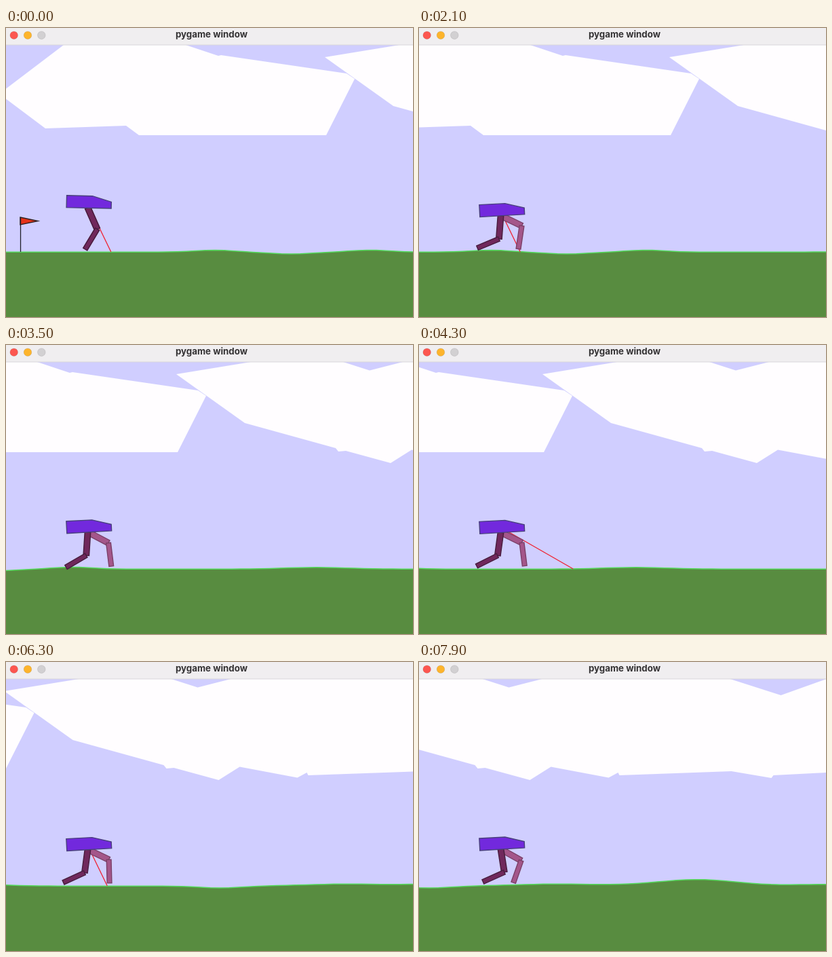
An HTML page with a canvas for the animation above (8 s loop, 600x426 px).

```html
<!DOCTYPE html>
<html lang="en">
<head>
<meta charset="utf-8">
<title>pygame window</title>
<style>
  html, body { margin: 0; width: 100%; height: 100%; overflow: hidden; }
  canvas { display: block; }
  h1 {
    position: absolute; left: 0; top: 0; width: 600px; margin: 0;
    box-sizing: border-box; padding-left: 6px;
    font: bold 13.3px/18px Inter, sans-serif; text-align: center; color: #343234;
  }
</style>
</head>
<body>
<canvas id="stage" width="600" height="426"></canvas>
<h1>pygame window</h1>
<script>
const ctx = document.getElementById('stage').getContext('2d');
const LOOP = 8000, STEP = 100, RAD = Math.PI / 180, END = 1850;

// Cloud corners; clouds scroll at half the speed of the ground.
const clouds = [
  [-10,97, 85,25, 265,25, 313,41, 317,40, 502,67, 514,75, 472,158, 196,158, 177,144, 58,148],
  [470,43, 580,25, 716,25, 755,37.5, 804,25, 1081,25, 1156,49, 1223,25, 1223,163,
   1145,167, 1142,171, 1083,161, 918,167, 916,163, 902,170.5, 817,154.5, 786,174,
   720,156, 709,157, 705,152, 571,115]
];

// Hills and hollows: centre, height, width.
const bumps = [[308, -2.7, 40], [420, 2.8, 45], [535, -2.8, 40], [895, -2.4, 65],
  [1260, 2.8, 45], [1450, -3, 90], [1655, -9.5, 85], [1850, -2.5, 70]];

// Progress: time, distance walked, strides taken.
const progress = [[0, 0, -7], [2100, 202, .15], [3500, 438, 4.9], [4300, 576, 8],
  [5600, 814, 12.66], [7000, 1076, 17.47], [7900, 1245, 20.32]];

const mix = (a, b, u) => a + (b - a) * u;

const groundY = x => bumps.reduce(
  (y, [centre, height, width]) => y + height * Math.exp(-(((x - centre) / width) ** 2)), 330.2);

const ground = [];
for (let x = 0; x <= END; x += 14) ground.push(x, groundY(x));

function progressAt(t) {
  let i = 0;
  while (i < progress.length - 2 && t >= progress[i + 1][0]) i++;
  const [t0, d0, s0] = progress[i], [t1, d1, s1] = progress[i + 1];
  const u = (t - t0) / (t1 - t0);
  const eased = i ? u : u ** 1.7; // speeds up from rest
  return [mix(d0, d1, eased), mix(s0, s1, u)];
}

// Hull height, then angles in degrees: tilt, near thigh and shin, far thigh and shin.
function poseAt(t, stride) {
  const wave = (peak, n = 1) => Math.cos(2 * Math.PI * n * (stride - peak));
  const stand = [257, 1.5, 24, -31, 24, -31];
  const walk = [
    267.5 + wave(.12),
    -3,
    5.5 + 13.5 * wave(.53),
    -61.5 - 6 * wave(.2),
    60.5 + 4 * wave(.08),
    -9.5 + 14 * wave(.95) + 4 * wave(.95, 2)
  ];
  const w = Math.min(1, t / 900);
  return stand.map((v, i) => mix(v, walk[i], w * w * (3 - 2 * w)));
}

function trace(points, dx = 0) {
  ctx.beginPath();
  for (let i = 0; i < points.length; i += 2) ctx.lineTo(points[i] - dx, points[i + 1]);
}

function stroke(color, width) {
  ctx.strokeStyle = color;
  ctx.lineWidth = width;
  ctx.stroke();
}

function shape(points, fill, edge, dx) {
  trace(points, dx);
  ctx.closePath();
  ctx.fillStyle = fill;
  ctx.fill();
  if (edge) stroke(edge, 1.4);
}

function bone(x, y, angle, width, fill, edge) {
  const length = 34.5, w = width / 2;
  ctx.save();
  ctx.translate(x, y);
  ctx.rotate(-angle * RAD);
  shape([-w, 0, w, 0, w, length, -w, length], fill, edge);
  ctx.restore();
  return [x + length * Math.sin(angle * RAD), y + length * Math.cos(angle * RAD)];
}

function leg(y, thigh, shin, fill, edge) {
  const knee = bone(120.5, y, thigh, 8.5, fill, edge);
  bone(...knee, shin, 6.8, fill, edge);
}

// The beam sweeps out and back during the first fifth of each cycle.
function drawBeam(t, y) {
  const n = Math.floor(3 + t / 21) % 100;
  if (n >= 20) return;
  const angle = .15 * (n < 10 ? n : 19 - n);
  const reach = Math.min(160, (330 - y) / Math.cos(angle));
  trace([119.5, y, 119.5 + reach * Math.sin(angle), y + reach * Math.cos(angle)]);
  stroke('#f02030', 1.3);
}

function drawWalker(t, stride) {
  const [y, tilt, thigh, shin, farThigh, farShin] = poseAt(t, stride);
  drawBeam(t, y);
  leg(y + 8, farThigh, farShin, '#a4568a', '#7b4068');
  leg(y + 8, thigh, shin, '#70285c', '#481d3e');
  ctx.save();
  ctx.translate(120.3, y);
  ctx.rotate(tilt * RAD);
  shape([-31, -9.5, 7, -9.5, 35, -1.5, 35, 8, -31, 8.5], '#7229dd', '#48407c');
  ctx.restore();
}

function drawBar() {
  ctx.fillStyle = '#f0eef0';
  ctx.fillRect(0, 0, 600, 25);
  ctx.fillStyle = '#d9d7dc';
  ctx.fillRect(0, 24.5, 600, 1);
  ['#fc5650', '#fdb42c', '#d2d0d2'].forEach((color, i) => {
    ctx.beginPath();
    ctx.arc(11.7 + 20.3 * i, 10.7, 5.8, 0, 7);
    ctx.fillStyle = color;
    ctx.fill();
    stroke('rgba(0, 0, 0, .12)', .8);
  });
}

function draw(t) {
  const [x, stride] = progressAt(t);
  ctx.fillStyle = '#d0ceff';
  ctx.fillRect(0, 0, 600, 426);
  clouds.forEach(c => shape(c, '#fffdff', null, x / 2));

  shape([...ground, END, 430, 0, 430], '#588c40', null, x);
  trace(ground, x);
  stroke('#55d95c', 1.5);

  shape([21, 279, 47, 284.5, 21, 290], '#e6331a', '#302020', x);
  trace([21.5, 279, 21.5, 330], x);
  stroke('#202028', 1.3);

  drawWalker(t, stride);
  drawBar();
}

function tick() {
  draw(Math.floor(performance.now() % LOOP / STEP) * STEP);
  requestAnimationFrame(tick);
}
tick();
</script>
</body>
</html>
```
